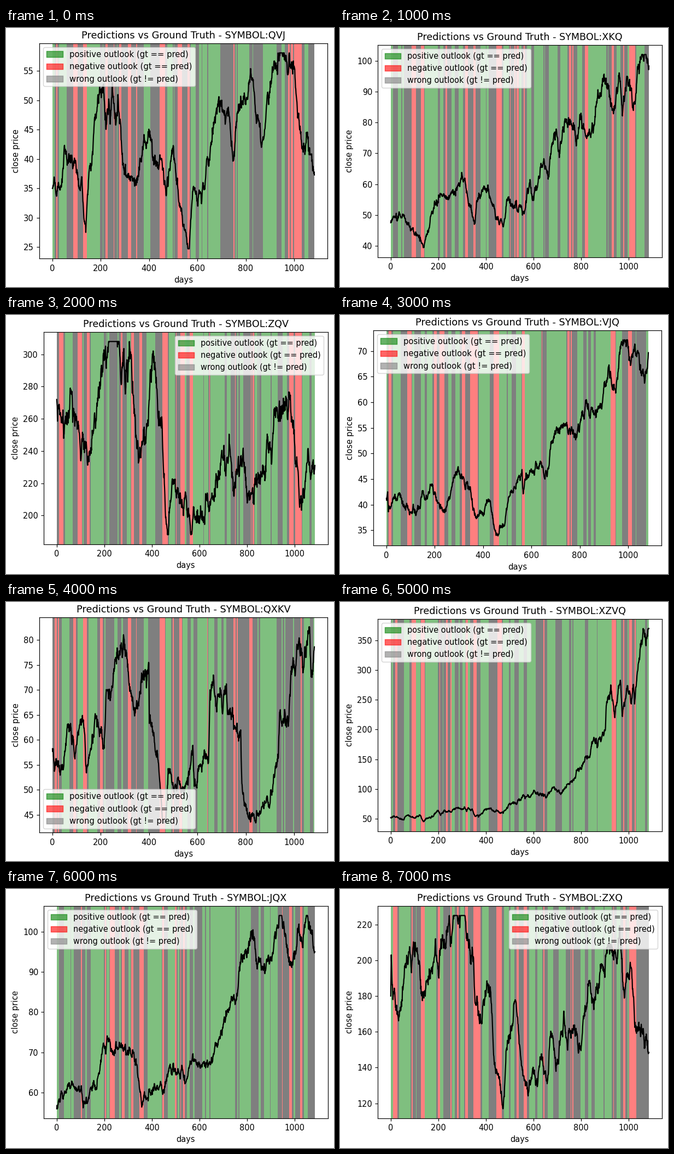
Animation, 600 px wide and 472 px high, one loop 8000 ms. Source, as a matplotlib script:

```python
import matplotlib.pyplot as plt
import numpy as np
from matplotlib.animation import FuncAnimation
from matplotlib.patches import Patch

W, H, DPI = 600, 472, 100
LAST_DAY = 1084
DAYS = np.arange(LAST_DAY + 1)

# left, bottom, width, height of the axes in pixels, and the scale of text and lines
NARROW = (61, 51.7, 527, 392.8, 1.0625)
WIDE = (69.2, 54, 519.4, 387.3, 1.0474)

# day ranges for which a negative outlook is predicted, shared by all symbols
DOWN = [(9, 27), (87, 105), (126, 142), (198, 208), (220, 256), (270, 285),
        (312, 325), (347, 378), (444, 467), (497, 503), (519, 537), (558, 573),
        (640, 646), (749, 757), (762, 768), (815, 829), (927, 949), (975, 995),
        (1001, 1031)]

# symbol, layout, volatility, legend place, (day, price) turning points
CHARTS = [
    ("QVJ", NARROW, .014, "upper left",
     [(0, 35), (48, 41.6), (121, 37), (138, 27.5), (153, 38.5), (193, 51),
      (209, 52.5), (221, 45.1), (248, 53), (261, 46), (271, 51), (297, 38),
      (356, 37), (399, 45.1), (469, 34.7), (499, 42), (533, 31.5), (566, 24.7),
      (582, 35), (623, 36), (682, 48.8), (711, 47.5), (750, 39.9), (829, 53.6),
      (867, 42.5), (892, 51), (958, 58.1), (996, 56), (1032, 41.8), (1055, 44.6),
      (1084, 37.3)]),
    ("XKQ", WIDE, .011, "upper left",
     [(0, 47.5), (50, 50.3), (137, 39.4), (172, 51), (239, 55), (298, 63.8),
      (354, 47.4), (360, 54), (411, 58.3), (455, 47), (471, 46.3), (491, 55),
      (537, 52.2), (563, 51.5), (585, 61.5), (661, 61.6), (675, 72.3), (732, 81.2),
      (746, 81.4), (778, 73.6), (799, 83), (822, 75), (916, 90.7), (930, 83.9),
      (960, 96), (973, 82.1), (994, 94.9), (1028, 87.5), (1056, 102), (1084, 98.3)]),
    ("ZQV", WIDE, .013, "upper right",
     [(0, 272), (30, 250), (60, 278), (138, 240), (185, 288), (305, 308),
      (356, 243), (411, 294), (466, 188), (500, 216), (566, 189), (725, 244),
      (855, 222), (962, 274), (1020, 205), (1084, 231)]),
    ("VJQ", NARROW, .008, "upper left",
     [(0, 41.2), (5, 42.5), (8, 38.6), (60, 41.4), (139, 39.2), (148, 42.7),
      (187, 43.8), (211, 40.3), (306, 45.1), (347, 43.5), (358, 38.9), (381, 37.7),
      (422, 41.1), (462, 33.9), (505, 41.4), (562, 46.1), (566, 42.1), (573, 45),
      (637, 48.5), (657, 45.5), (734, 55.9), (788, 53.2), (802, 56.1), (867, 57),
      (928, 65.7), (949, 61.8), (964, 69.5), (994, 72.2), (1010, 67.2), (1030, 70.1),
      (1071, 65), (1084, 69.7)]),
    ("QXKV", NARROW, .011, "lower left",
     [(0, 58.2), (8, 53.7), (44, 54), (60, 62.1), (92, 56.5), (121, 64.2),
      (141, 53.4), (175, 63.9), (214, 58.3), (225, 70), (286, 78.4), (320, 69.7),
      (354, 67), (399, 75.4), (401, 63.3), (456, 44), (468, 43.4), (481, 53.7),
      (533, 49.5), (582, 57.7), (587, 50.7), (646, 55.5), (652, 70), (720, 71.2),
      (725, 65.1), (779, 62), (784, 51.3), (856, 45), (935, 56.5), (940, 65.1),
      (976, 62.7), (994, 74.8), (1064, 82.6), (1071, 72.6), (1084, 78.6)]),
    ("XZVQ", WIDE, .014, "upper left",
     [(0, 52), (126, 55), (137, 45), (202, 62), (210, 56), (332, 66), (354, 54),
      (400, 67), (472, 59), (605, 96), (655, 86), (690, 101), (715, 92), (775, 118),
      (780, 132), (835, 153), (842, 172), (902, 204), (905, 240), (926, 265),
      (941, 220), (964, 283), (973, 222), (994, 274), (1010, 243), (1019, 276),
      (1024, 243), (1063, 368), (1072, 341), (1084, 370)]),
    ("JQX", WIDE, .008, "upper left",
     [(0, 56), (138, 60), (190, 69.5), (335, 67), (356, 57), (450, 60), (480, 65.5),
      (655, 68), (727, 81), (845, 92), (905, 94), (945, 104), (977, 93), (1020, 99),
      (1084, 95)]),
    ("ZXQ", WIDE, .012, "upper right",
     [(0, 180), (2, 203), (9, 178), (78, 205), (87, 193), (103, 210), (138, 180),
      (188, 212), (202, 190), (218, 214), (271, 225), (310, 225), (347, 202),
      (354, 176), (379, 165), (406, 186), (422, 176), (432, 147), (472, 117),
      (487, 151), (523, 177), (569, 132), (627, 146), (657, 131), (677, 159),
      (705, 142), (728, 169), (790, 149), (840, 182), (900, 193), (962, 214),
      (976, 185), (994, 193), (1038, 161), (1084, 148.5)]),
]


def prices(points, vol, seed):
    """Trend through the turning points and a seeded walk pinned to them."""
    knots, values = np.array(points).T
    trend = np.interp(DAYS, knots, values)
    walk = np.cumsum(np.random.default_rng(seed).normal(0, vol, DAYS.size))
    walk -= np.interp(DAYS, knots, walk[knots.astype(int)])
    price = np.clip(trend * (1 + walk), values.min(), values.max())
    return trend, price


def outlook(curve):
    """Runs of (first day, last day, kind); kind is 0 up, 1 down, 2 wrong."""
    pred = np.ones(DAYS.size, bool)
    for a, b in DOWN:
        pred[a:b] = False
    lag, box = 10, 9
    padded = np.pad(curve, (lag + box // 2, box // 2), mode="edge")
    smooth = np.convolve(padded, np.ones(box) / box, mode="valid")
    truth = smooth[lag:] > smooth[:-lag]
    kind = np.where(truth != pred, 2, np.where(truth, 0, 1))
    edges = np.flatnonzero(np.diff(kind)) + 1
    starts = [0, *edges]
    return zip(starts, [*edges, LAST_DAY], kind[starts])


def style(k):
    rc = {"font.family": "DejaVu Sans", "font.size": 10 * k,
          "axes.linewidth": .8 * k, "axes.titlepad": 6 * k, "axes.labelpad": 4 * k,
          "lines.linewidth": 1.5 * k, "patch.linewidth": k}
    for tick in ("xtick", "ytick"):
        rc[f"{tick}.major.size"] = rc[f"{tick}.major.pad"] = 3.5 * k
        rc[f"{tick}.major.width"] = .8 * k
    return rc


def draw(i):
    symbol, (x, y, w, h, k), vol, loc, points = CHARTS[i]
    trend, price = prices(points, vol, i)
    fig.clear()
    with plt.rc_context(style(k)):
        ax = fig.add_axes([x / W, y / H, w / W, h / H])
        for a, b, kind in outlook((trend + price) / 2):
            ax.axvspan(a, b, facecolor="grk"[kind], alpha=.5, linewidth=0)
        ax.plot(DAYS, price, color="k")
        ax.set_xlim(-LAST_DAY * .05, LAST_DAY * 1.05)
        pad = np.ptp(price) * .05
        ax.set_ylim(price.min() - pad, price.max() + pad)
        ax.set_title(f"Predictions vs Ground Truth - SYMBOL:{symbol}")
        ax.set_xlabel("days")
        ax.set_ylabel("close price")
        keys = [("g", "positive outlook (gt == pred)"),
                ("r", "negative outlook (gt == pred)"),
                ("gray", "wrong outlook (gt != pred)")]
        ax.legend(handles=[Patch(color=c, alpha=.6, label=t) for c, t in keys], loc=loc)
    return []


fig = plt.figure(figsize=(W / DPI, H / DPI), dpi=DPI, facecolor="white")
anim = FuncAnimation(fig, draw, frames=len(CHARTS), interval=1000,
                     init_func=lambda: [], repeat=True, repeat_delay=0)
plt.show()
```
